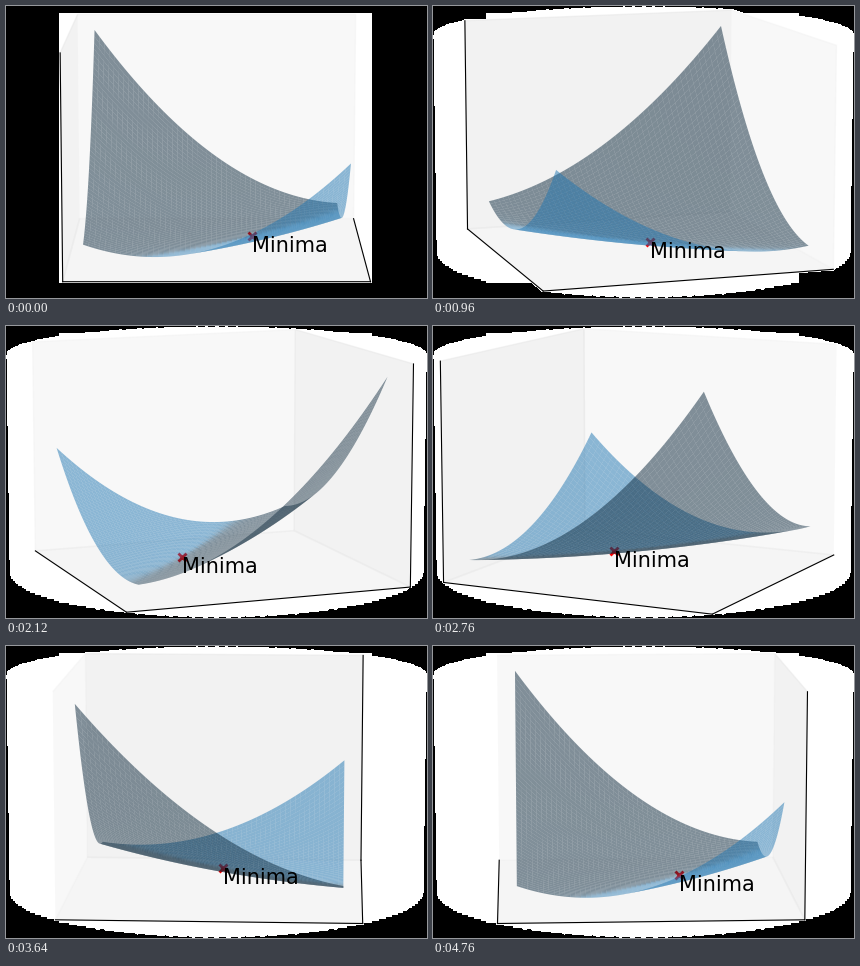
A matplotlib script for the animation above (4800 ms loop, 421 by 292 pixels).

```python
import itertools
import math

import matplotlib.pyplot as plt
import numpy as np
from matplotlib.animation import FuncAnimation
from matplotlib.collections import PolyCollection
from matplotlib.patches import Rectangle

W, H, DPI = 421, 292, 100
FRAMES, INTERVAL = 120, 40
STEP, ELEV = 3, 10

# Square 3D axes in pixels, placed so the cube centre projects to CENTER.
SIZE = 454
SCALE = SIZE / 0.185
CENTER = (210.6, 135.3)
UNIT = 1.8294640721620434 * 25 / 24 / math.sqrt(41)
HALF = np.array([2, 2, 1.5]) * UNIT
DIST = 10

HEIGHT = 60
BEST = (0.035, 0.28)


def azimuth(i):
    # the tiny offset settles which side wall counts as the back one
    return STEP * i + 1e-3


def loss(u, v):
    quad = 0.166 * u**2 + 0.2215 * v**2 + 0.344 * u * v
    return HEIGHT * (0.0213 - 0.109 * u - 0.138 * v + quad)


def project(signs, azim):
    x, y, z = np.array(signs) * HALF
    a, e = math.radians(azim), math.radians(ELEV)
    near = x * math.cos(a) + y * math.sin(a)
    side = y * math.cos(a) - x * math.sin(a)
    up = z * math.cos(e) - near * math.sin(e)
    depth = DIST - near * math.cos(e) - z * math.sin(e)
    return CENTER[0] + SCALE * side / depth, CENTER[1] - SCALE * up / depth


def back_walls(azim):
    """Screen quads of the three cube faces turned away from the viewer."""
    a = math.radians(azim)
    far = (-math.copysign(1, math.cos(a)), -math.copysign(1, math.sin(a)), -1)
    quads = []
    for axis, sign in enumerate(far):
        ring = [(-1, -1), (1, -1), (1, 1), (-1, 1)]
        corners = [list(p[:axis]) + [sign] + list(p[axis:]) for p in ring]
        quads.append([project(c, azim) for c in corners])
    return quads


fig = plt.figure(figsize=(W / DPI, H / DPI), dpi=DPI, facecolor="black")

# White trail: everything the turning box has covered so far.
back = fig.add_axes([0, 0, 1, 1])
back.set_axis_off()
back.set(xlim=(0, W), ylim=(H, 0))
back.add_patch(Rectangle((53, 7), 313, 270, fc="white", lw=0,
                         antialiased=False))
walls = [back_walls(azimuth(i)) for i in range(FRAMES)]
trail = PolyCollection([], facecolors="white", edgecolors="white",
                       linewidths=1.1, antialiaseds=False)
back.add_collection(trail, autolim=False)

left = CENTER[0] - SIZE * 0.095 / 0.185
bottom = H - CENTER[1] - SIZE * 0.095 / 0.185
ax = fig.add_axes([left / W, bottom / H, SIZE / W, SIZE / H], projection="3d")
ax.patch.set_visible(False)

grid = np.linspace(-1, 1, 51)
U, V = np.meshgrid(grid, grid)
ax.plot_surface(U, V, loss(U, V), rstride=1, cstride=1, color="tab:blue",
                alpha=0.5)
low = loss(*BEST)
ax.plot([BEST[0]], [BEST[1]], [low], "x", color="red", ms=6, mew=2)
ax.text(*BEST, low, "Minima", fontsize=15, family="DejaVu Sans", va="top",
        zorder=10)

reach = 1.1 * 25 / 24
ax.set_xlim(-reach, reach)
ax.set_ylim(-reach, reach)
ax.set_zlim(HEIGHT * (1 - reach) / 2, HEIGHT * (1 + reach) / 2)
ax.set_xticks([])
ax.set_yticks([])
ax.set_zticks([])


def update(i):
    trail.set_verts(list(itertools.chain(*walls[:i + 1])))
    ax.view_init(elev=ELEV, azim=azimuth(i))
    return []


anim = FuncAnimation(fig, update, frames=FRAMES, interval=INTERVAL,
                     repeat=True, repeat_delay=0)
plt.show()
```
